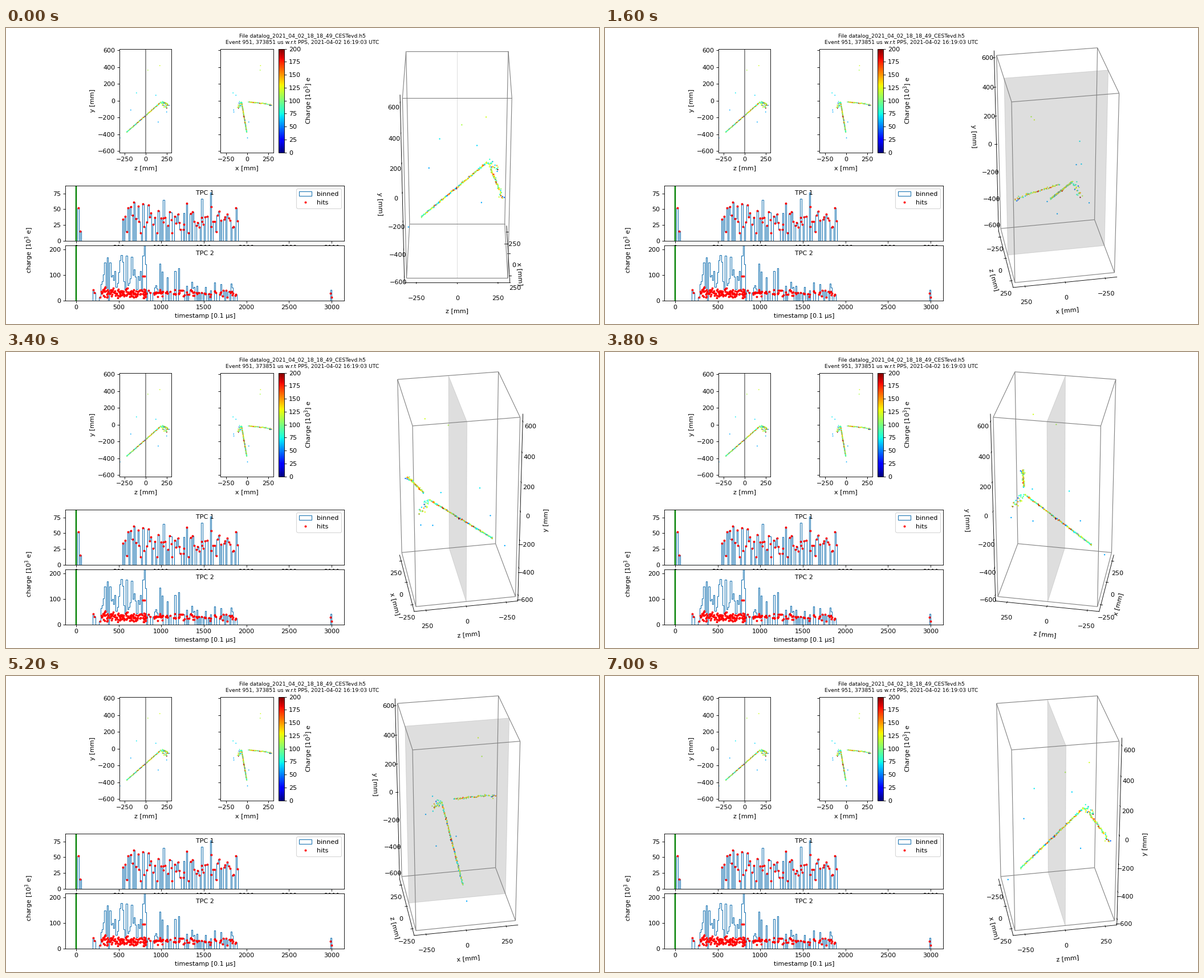
A matplotlib script that plays this animation: 1040 by 520 pixels, repeating every 7.2 s.

```python
from itertools import combinations, product

import matplotlib.pyplot as plt
import numpy as np
from matplotlib.animation import FuncAnimation
from mpl_toolkits.mplot3d.art3d import Line3DCollection, Poly3DCollection

W, H, DPI = 1040, 520, 80
FRAMES, INTERVAL = 36, 200
HALF, HALF_Y = 310, 620          # detector half sizes in mm

rng = np.random.default_rng(951)
fig = plt.figure(figsize=(W / DPI, H / DPI), dpi=DPI, facecolor="white")


def px_axes(left, top, right, bottom, **kwargs):
    """Add axes whose frame lines lie on the given pixel columns and rows."""
    rect = [(left + 0.3) / W, (H - bottom - 0.6) / H,
            (right - left) / W, (bottom - top) / H]
    return fig.add_axes(rect, **kwargs)


def charges(mean, spread, low, high, count):
    return np.clip(rng.normal(mean, spread, count), low, high)


def track(points, count, spread):
    """Hits scattered along a polyline of (x, y, z) points."""
    points = np.array(points, float)
    steps = np.linalg.norm(np.diff(points, axis=0), axis=1)
    along = np.r_[0, np.cumsum(steps)]
    where = np.linspace(0, along[-1], count)
    line = np.column_stack([np.interp(where, along, c) for c in points.T])
    return line + rng.normal(0, spread, line.shape)


# Hits in space: a long track, a second one, a short spray and lone hits
vertex = (-65, -20, 181)
tracks = np.vstack([
    track([(-4, -376, -225), vertex], 135, 2),
    track([(18, -15, 205), (230, -38, 252)], 45, 2.5),
    track([(230, -38, 252), (300, -55, 270)], 14, 9),
])
spray = track([vertex, (-105, -80, 252)], 26, 9)
lone = np.array([
    (159, 417, 169), (155, 363, 27), (-166, 92, -108), (-132, 64, 122),
    (-159, -112, -176), (20, -255, 150), (-157, -135, 250), (5, -444, -305),
])
x, y, z = np.vstack([tracks, spray, lone]).T
charge = np.r_[charges(118, 38, 45, 200, len(tracks)),
               charges(90, 35, 40, 200, len(spray)),
               58 + 0.15 * np.maximum(lone[:, 1], 0)]
colors = dict(c=charge, cmap="jet", vmin=0, vmax=200, linewidths=0)

fig.suptitle("File datalog_2021_04_02_18_18_49_CESTevd.h5\n"
             "Event 951, 373851 us w.r.t PPS, 2021-04-02 16:19:03 UTC",
             fontsize="small")

# Flat projections
ax_zy = px_axes(199, 36, 290, 218, xlim=(-308, 308), xlabel="z [mm]", ylabel="y [mm]")
ax_xy = px_axes(376, 36, 469, 218, xlim=(-314, 314), xlabel="x [mm]")
for ax, across in ((ax_zy, z), (ax_xy, x)):
    dots = ax.scatter(across, y, s=2.6, **colors)
    ax.set(ylim=(-617, 617), xticks=[-250, 0, 250], yticks=range(-600, 601, 200))
ax_xy.tick_params(labelleft=False)
ax_zy.axvline(0, color="gray")
fig.colorbar(dots, cax=px_axes(478, 36, 488, 218), ticks=range(0, 201, 25),
             label=r"Charge [$10^3$] e")


# Charge against time in the two chambers
def draw_times(ax, name, height, times, values):
    ax.hist(times, bins=range(0, 3001, 15), weights=values, histtype="step",
            color="C0", label="binned")
    ax.plot(times, values, "r.", markersize=5, label="hits")
    ax.axvline(0, color="g", linewidth=2.2)
    ax.text(0.5, height, name, transform=ax.transAxes, ha="center", va="center")


ax_t1 = px_axes(104, 276, 593, 373)
ax_t2 = px_axes(104, 381, 593, 478, xlabel="timestamp [0.1 µs]")

times_1 = np.linspace(555, 1900, 66) + rng.normal(0, 8, 66)
draw_times(ax_t1, "TPC 1", 0.865, np.r_[25, 45, times_1],
           np.r_[52, 15, charges(33, 13, 12, 61, 66)])

times_2 = np.r_[rng.uniform(280, 825, 125), rng.uniform(825, 1900, 75)]
draw_times(ax_t2, "TPC 2", 0.855, np.r_[203, 215, 785, 806, 2988, 2999, times_2],
           np.r_[41, 31, 95, 94, 29, 13, charges(28, 9, 11, 60, 200)])

ax_t1.set(xlim=(-126, 3151), ylim=(0, 87.7), yticks=[0, 25, 50, 75])
ax_t2.set(xlim=(-126, 3151), ylim=(0, 215.6), yticks=[0, 100, 200])
ax_t1.legend(loc="upper right")
fig.text(41 / W, 1 - 390 / H, r"charge [$10^3$ e]", rotation=90,
         ha="center", va="center")

# Turning view
ax_3d = fig.add_axes([564.3 / W, 0.1, 442 / W, 0.85], projection="3d",
                     computed_zorder=False)
ax_3d.patch.set_visible(False)
ax_3d.grid(False)

corners = product((-HALF, HALF), (-HALF, HALF), (-HALF_Y, HALF_Y))
box = [(a, b) for a, b in combinations(corners, 2)
       if sum(i != j for i, j in zip(a, b)) == 1]
ax_3d.add_collection3d(Line3DCollection(box, colors="gray", linewidths=1, zorder=1))
ax_3d.scatter(x, z, y, s=4.5, depthshade=False, zorder=2, **colors)

cathode = [(-HALF, 0, -HALF_Y), (HALF, 0, -HALF_Y), (HALF, 0, HALF_Y), (-HALF, 0, HALF_Y)]
veil = (0.5, 0.5, 0.5, 0.26)
ax_3d.add_collection3d(Poly3DCollection([cathode], facecolors=[veil], edgecolors=[veil],
                                        linewidths=0.8, zorder=3))

pad = 25 / 24                    # axis lines stand slightly off the box
ax_3d.set(xlim=(-HALF * pad, HALF * pad), ylim=(-HALF * pad, HALF * pad),
          zlim=(-HALF_Y * pad, HALF_Y * pad), xlabel="x [mm]", ylabel="z [mm]",
          xticks=[-250, 0, 250], yticks=[-250, 0, 250],
          zticks=range(-600, 601, 200))
ax_3d.set_zlabel("y [mm]", labelpad=20)
ax_3d.set_box_aspect((1, 1, 2))
for axis in (ax_3d.xaxis, ax_3d.yaxis, ax_3d.zaxis):
    axis.set_pane_color((1, 1, 1, 0))


def update(frame):
    ax_3d.view_init(elev=30, azim=frame * 360 / FRAMES)
    return []


animation = FuncAnimation(fig, update, frames=FRAMES, interval=INTERVAL,
                          repeat=True, repeat_delay=0)
plt.show()
```
